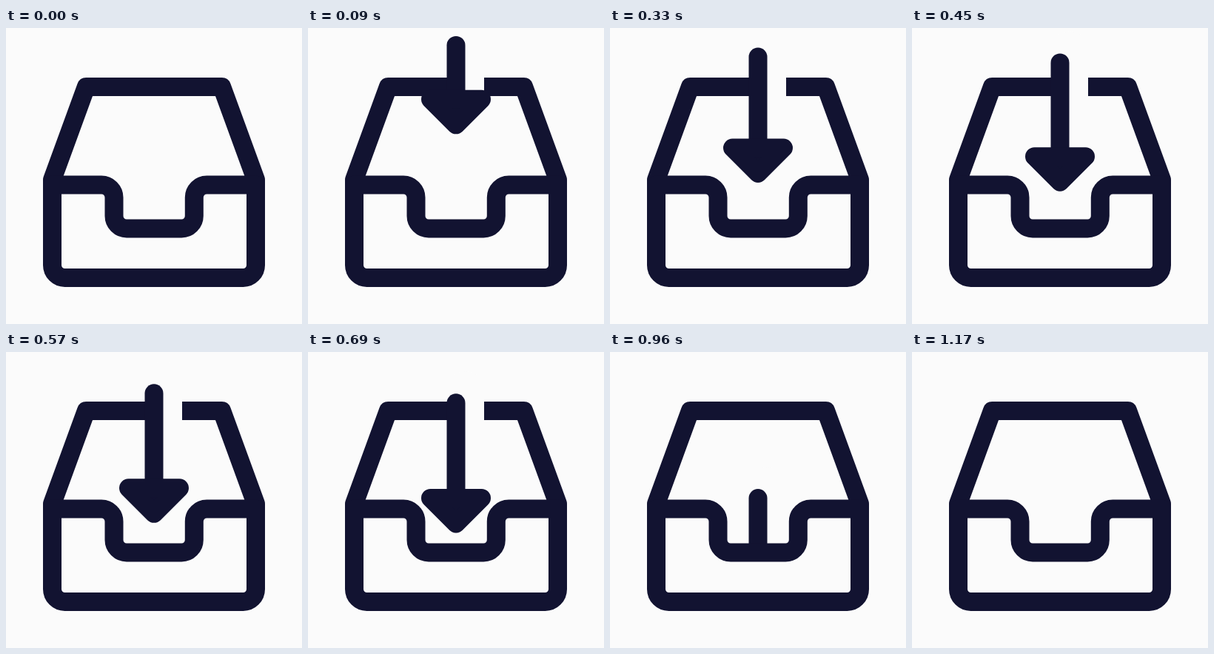
Write an HTML page that moves like this. It is 400 px wide and 400 px high and loops after 1230 ms.

```html
<!DOCTYPE html>
<html lang="en">
<head>
<meta charset="utf-8">
<title>Inbox</title>
<style>
  html, body { margin: 0; height: 100%; overflow: hidden; background: #fbfbfb; }
  svg { display: block; width: 100%; height: 100%; }
  path { stroke: #121331; stroke-width: 25; stroke-linejoin: round; stroke-linecap: round; fill: none; }
  #gap { stroke: #fbfbfb; stroke-width: 50; }
  #head { fill: #121331; }
  #tray { fill: #fbfbfb; }
</style>
</head>
<body>
<svg viewBox="0 0 400 400">
  <clipPath id="above"><path d="M0-200H400V284H0z"/></clipPath>
  <path d="M62.5 212V205L108.3 79.5H291.7L337.5 205V212"/>
  <g id="arrow" clip-path="url(#above)">
    <path id="gap"/>
    <path id="shaft"/>
    <path id="head" d="M165.5 12.5H234.5L200 47z"/>
  </g>
  <path id="tray" d="M62.5 212H129a17 17 0 0 1 17 17V254a17 17 0 0 0 17 17H237.3a17 17 0 0 0 17-17V229a17 17 0 0 1 17-17H337.5V320.5a17 17 0 0 1-17 17H79.5a17 17 0 0 1-17-17z"/>
</svg>
<script>
  const LOOP = 1230, STEP = 30, START = 30, END = 1020;
  const [arrow, gap, shaft, head] =
    ['arrow', 'gap', 'shaft', 'head'].map(id => document.getElementById(id));

  function draw(t) {
    arrow.style.display = t >= START && t < END ? '' : 'none';
    const age = Math.max(0, t - START);
    // A slow drift that ends in a sharp drop into the tray
    const top = 7 + 0.065 * age + 200 * (age / (END - START)) ** 8.5;
    // The shaft shoots out quickly, then settles at full length
    const length = 129 - 128 * Math.exp(-0.0296 * age ** 0.813);
    const base = top + length;
    shaft.setAttribute('d', `M200 ${top + 12.5}V${base + 12.5}`);
    gap.setAttribute('d', `M213 ${top - 5}V${base}`);
    head.setAttribute('transform', `translate(0 ${base})`);
  }

  function tick() {
    const t = performance.now() % LOOP;
    draw(Math.floor(t / STEP) * STEP);
    requestAnimationFrame(tick);
  }
  tick();
</script>
</body>
</html>
```
